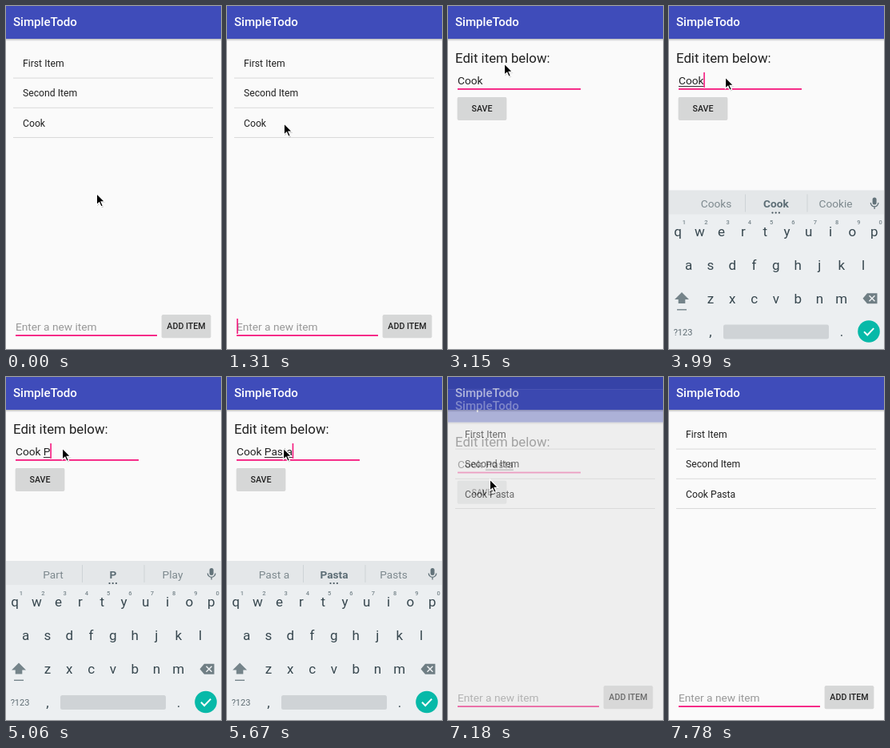
Animation, 269 px wide and 429 px high, one loop 8 s. Source, as an HTML page:

```html
<!DOCTYPE html>
<html lang="en">
<head>
<meta charset="utf-8">
<title>Todo list</title>
<style>
html, body { margin: 0; width: 100%; height: 100%; overflow: hidden; background: #000; }
svg { display: block; width: 100vw; height: 100vh; }
text { font-family: Roboto, "Open Sans", sans-serif; fill: #212121; white-space: pre; }
.title { font-size: 15.1px; font-weight: 500; fill: #fff; }
.item { font-size: 12.2px; }
.field { font-size: 13.7px; }
.hint { fill: #989898; }
.label { font-size: 16.8px; }
.button { font-size: 10.65px; font-weight: 500; text-anchor: middle; }
.key { font-size: 17px; fill: #37474f; text-anchor: middle; }
.digit { font-size: 7.5px; font-weight: 500; fill: #78868c; text-anchor: middle; }
.word { font-size: 13.7px; fill: #7d898e; text-anchor: middle; }
.best { font-weight: 700; fill: #5c6d75; }
.small { font-size: 11px; fill: #5f6d74; text-anchor: middle; }
</style>
</head>
<body>
<svg id="stage" viewBox="0 0 269 429" preserveAspectRatio="none">
  <defs>
    <linearGradient id="shade" x1="0" y1="0" x2="0" y2="1">
      <stop offset="0" stop-color="#000" stop-opacity=".26"/>
      <stop offset="1" stop-color="#000" stop-opacity="0"/>
    </linearGradient>
    <path id="arrow" d="M0 0V14.2L3.3 11.2L5.6 16.4L8 15.4L5.7 10.3H10.2Z"/>
  </defs>
  <g id="list"></g>
  <g id="edit"></g>
  <g id="keys"></g>
  <g id="mouse">
    <use href="#arrow" x=".8" y="1.2" opacity=".22"/>
    <use href="#arrow" stroke="#fff" stroke-width="1.2"/>
  </g>
</svg>
<script>
const LOOP = 8000;
const PINK = '#f5177d';
const $ = id => document.getElementById(id);

const rect = (x, y, w, h, fill, more = '') =>
  `<rect x="${x}" y="${y}" width="${w}" height="${h}" fill="${fill}" ${more}/>`;
const text = (x, y, cls, str, more = '') =>
  `<text x="${x}" y="${y}" class="${cls}" ${more}>${str}</text>`;

const page = () =>
  rect(0, -18, 269, 18, '#303f9f') + rect(0, 0, 269, 460, '#fafafa') +
  rect(0, 41, 269, 3, 'url(#shade)') + rect(0, 0, 269, 41, '#3f4cba') +
  text(9, 25, 'title', 'SimpleTodo');

const button = (x, y, label) =>
  rect(x - .4, y, 61.8, 29, '#000', 'rx="2" opacity=".14"') +
  rect(x, y, 61, 28.2, '#d6d7d7', 'rx="1.5"') +
  text(x + 30.5, y + 18, 'button', label);

const underline = (y, w) => rect(12, y, w, 1.8, PINK);
const caret = (id, y) => rect(12.2, y, 1.6, 19, PINK, `id="${id}"`);

function buildList() {
  const rows = ['First Item', 'Second Item', 'Cook'].map((name, i) =>
    text(21, 76.2 + 37.2 * i, 'item', name, `id="row${i}"`) +
    rect(9, 89.6 + 37.2 * i, 250, 1, '#dadada'));
  $('list').innerHTML = page() + rows.join('') +
    text(12, 406, 'field hint', 'Enter a new item') +
    underline(411.2, 177) + button(195, 386.2, 'ADD ITEM') + caret('listCaret', 391);
}

function buildEdit() {
  $('edit').innerHTML = page() +
    text(9, 71, 'label', 'Edit item below:') +
    text(12, 98, 'field', 'Cook', 'id="entry"') +
    underline(103, 154) + rect(12, 100, 0, 1, '#333', 'id="compose"') +
    caret('editCaret', 83) + button(12, 114, 'SAVE');
}

function buildKeys() {
  const row = (chars, x, y, cls = 'key') =>
    [...chars].map((c, i) => text(x + 27.3 * i, y, cls, c)).join('');
  const dots = [-1, 0, 1].map(i =>
    `<circle cx="${133.7 + 4.2 * i}" cy="258" r="1.1" fill="#44545c"/>`).join('');
  $('keys').innerHTML =
    rect(0, 230, 269, 240, '#eceff1') + rect(0, 230, 269, 30, '#e4e7e9') +
    rect(95, 235, 1, 22, '#cdd3d6') + rect(172.5, 235, 1, 22, '#cdd3d6') +
    text(59, 251.5, 'word', '', 'id="word0"') +
    text(134, 251.5, 'word best', '', 'id="word1"') +
    text(208.5, 251.5, 'word', '', 'id="word2"') +
    `<g id="dots">${dots}</g>` +
    rect(254.6, 239, 5, 9, '#63737a', 'rx="2.5"') +
    '<path d="M252.3 245.5a4.8 4.8 0 0 0 9.6 0M257.1 250.5v3" fill="none" stroke="#63737a" stroke-width="1.3"/>' +
    row('qwertyuiop', 11, 287) + row('1234567890', 19, 272.6, 'digit') +
    row('asdfghjkl', 24.6, 329) + row('zxcvbnm', 52, 371) +
    '<path d="M16 357.5L25 366.5H20.3V371.5H11.7V366.5H7Z" fill="#75848a"/>' +
    rect(10, 378.6, 12, 1.4, '#75848a') +
    '<path d="M242.5 365.3L248 358.8H260.5V371.8H248Z" fill="#6f7e84"/>' +
    '<path d="M250.5 361.8l7 7m0-7l-7 7" stroke="#eceff1" stroke-width="1.5"/>' +
    text(17.5, 411, 'small', '?123') + text(52, 412.5, 'key', ',') + text(216, 412.5, 'key', '.') +
    rect(68, 398, 132, 18, '#cfd3d6', 'rx="2.5"') +
    '<circle cx="250" cy="406.5" r="13.8" fill="#07b9a8"/>' +
    '<path d="M244 406.8l4.2 4.2l8-8.4" fill="none" stroke="#fff" stroke-width="2"/>';
}

const set = (id, name, value) => $(id).setAttribute(name, value);
function place(id, x, y, alpha = 1) {
  set(id, 'transform', `translate(${x} ${y})`);
  set(id, 'opacity', alpha);
}
const progress = (t, from, to) => Math.min(1, Math.max(0, (t - from) / (to - from)));
const smooth = p => p * p * (3 - 2 * p);
const blink = (t, start) => t >= start && Math.floor((t - start) / 485) % 2 === 0 ? 1 : 0;

const MOVES = [
  { from: 510, to: 1310, x: 71.3, y: 146.9 },
  { from: 2980, to: 3150, x: 70.5, y: 72 },
  { from: 3230, to: 3410, x: 70.5, y: 89 },
  { from: 6180, to: 6410, x: 52.4, y: 128 },
  { from: 7580, to: 7770, x: 280, y: 136 },
];

function drawMouse(t) {
  let x = 113.4, y = 234.6;
  for (const move of MOVES) {
    const p = smooth(progress(t, move.from, move.to));
    x += (move.x - x) * p;
    y += (move.y - y) * p;
  }
  place('mouse', x, y);
}

function drawPages(t) {
  const open = progress(t, 2165, 2440), close = progress(t, 6960, 7300);
  const slide = 37 * ((1 - open) ** 1.5 + close ** 2);
  const alpha = 1 - (1 - open) ** 2.5 - close;
  place('list', 0, 0, 1 - .2 * open + .2 * close);
  place('edit', 0, slide, Math.max(0, alpha));

  const shown = progress(t, 3750, 4050) - progress(t, 6890, 7090);
  place('keys', 0, 70 * (1 - shown) ** 3, Math.min(1, 2 * shown));
}

const PRESSES = [4360, 4860, 5150, 5285, 5420, 5555];
const WORDS = ['Cooks,Cook,Cookie', 'for,and,in', 'Part,P,Play', 'Party,Pa,Pay',
  'Pass,Pas,Past', 'Paste,Past,Pasta', 'Past a,Pasta,Pasts'].map(w => w.split(','));
const pressed = t => PRESSES.filter(p => p <= t).length;

function drawEntry(t) {
  const entry = $('entry'), count = pressed(t);
  const value = 'Cook Pasta'.slice(0, 4 + count);
  const measure = str => {
    entry.textContent = str;
    return str ? entry.getComputedTextLength() : 0;
  };
  const left = count ? measure('Cook ') : 0;
  const full = measure(value);
  set('compose', 'x', 12 + left);
  set('compose', 'width', t < 3950 ? 0 : full - left);

  // The caret stays lit while keys are being pressed.
  const typing = t >= 3760 && t < 5650;
  set('editCaret', 'x', 12 + full - .2);
  set('editCaret', 'opacity', typing ? 1 : blink(t, t < 3760 ? 2225 : 5650) || +(t < 2225));

  const hints = pressed(t - 115);
  WORDS[hints].forEach((word, i) => { $('word' + i).textContent = word; });
  set('dots', 'opacity', hints === 1 ? 0 : 1);
}

function draw(t) {
  drawPages(t);
  drawMouse(t);
  drawEntry(t);
  set('listCaret', 'opacity', t < 2100 ? blink(t, 300) : blink(t, 7290));
  $('row2').textContent = t < 4500 ? 'Cook' : 'Cook Pasta';
}

function tick() {
  draw(performance.now() % LOOP);
  requestAnimationFrame(tick);
}

buildList();
buildEdit();
buildKeys();
tick();
</script>
</body>
</html>
```
